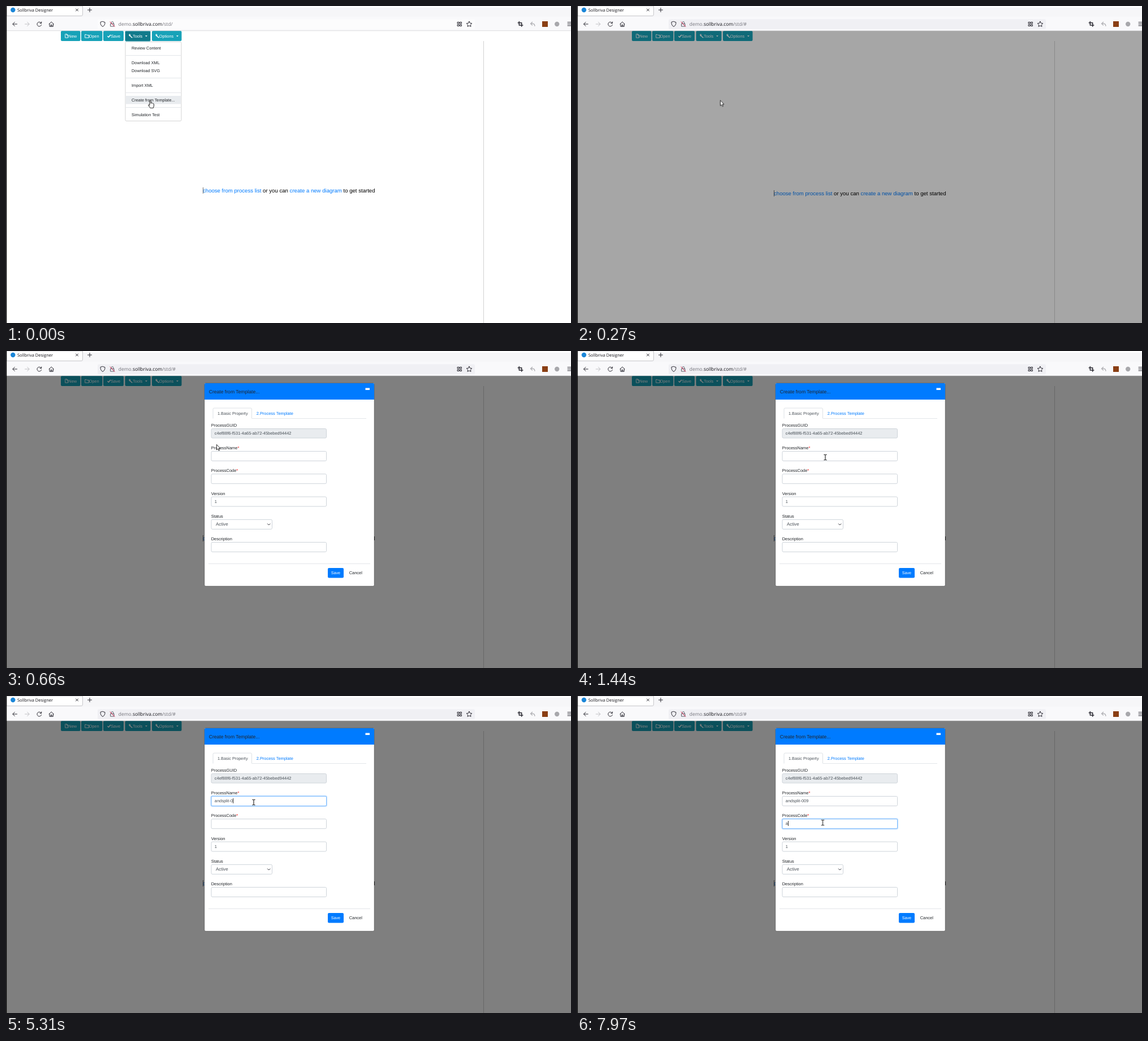
Recreate the animation shown at these times as an HTML page. Size 999x561 px, loop 8 s.

```html
<!DOCTYPE html>
<html lang="en">
<head>
<meta charset="utf-8">
<title>Process designer</title>
<style>
html, body { margin: 0; width: 100%; height: 100%; overflow: hidden; background: #fff; }
svg { display: block; width: 100%; height: 100%; }
text { font: 7.45px "Liberation Sans", Arial, sans-serif; text-rendering: geometricPrecision; white-space: pre; fill: #212529; }
.ui { font-family: "Open Sans", "Noto Sans", sans-serif; }
.line { fill: none; stroke: #2b2a33; stroke-width: 1; stroke-linecap: round; stroke-linejoin: round; }
.soft { fill: none; stroke: #e3e6e9; }
.btn rect { fill: #17a2b8; }
.btn text { fill: #fff; font-size: 7.4px; }
.btn path { fill: none; stroke: #fff; stroke-width: .9; stroke-linejoin: round; }
.btn .solid { fill: #fff; stroke: none; }
.menu text { font-size: 7.35px; }
.link { fill: #007bff; }
.field { fill: #fff; stroke: #ced4da; }
.val { fill: #495057; }
.must { fill: #f00; }

/* one 8 s cycle, every change is a hard cut */
.a { animation: 8s step-end infinite; }
.menu { animation-name: early; }
.hot { animation-name: early; }
.hash { animation-name: late; }
.intro { animation-name: settle; }
.urlbar { fill: #f0f0f4; animation-name: tint; }
.dim { animation-name: dim; }
.modal { animation-name: slide; }
.form { animation-name: load; }
.ring1 { animation-name: ring1; }
.ring2 { animation-name: ring2; }
.mouse { animation-name: path; }
.hand { animation-name: early; }
.arrow { animation-name: arrow; }
.beam { animation-name: beam; }

@keyframes early { 0% { visibility: visible } 1.875% { visibility: hidden } }
@keyframes late { 0% { visibility: hidden } 1.875% { visibility: visible } }
@keyframes settle { 0% { transform: none } 1.875% { transform: translateY(5px) } }
@keyframes tint { 0% { fill: #fcfcfd } 1.875% { fill: #f0f0f4 } }
@keyframes dim { 0% { opacity: 0 } 3.375% { opacity: .35 } 4.875% { opacity: .5 } }
@keyframes slide {
  0% { opacity: 0; transform: translateY(-30px) }
  4.875% { opacity: .45; transform: translateY(-20px) }
  6.75% { opacity: 1; transform: translateY(-3.5px) }
  8.25% { opacity: 1; transform: none }
}
@keyframes load { 0% { visibility: hidden } 6.75% { visibility: visible } }
@keyframes ring1 {
  0% { opacity: 0 } 19.875% { opacity: .35 } 21.375% { opacity: .85 }
  23.25% { opacity: 1 } 90.875% { opacity: 0 }
}
@keyframes ring2 { 0% { opacity: 0 } 90.875% { opacity: 1 } }
@keyframes path {
  0% { transform: translate(253px, 166.5px) }
  4.875% { transform: translate(257.5px, 166.5px) }
  6.75% { transform: translate(290px, 166px) }
  8.25% { transform: translate(372px, 165px) }
  9.75% { transform: translate(455px, 165px) }
  11.25% { transform: translate(492.5px, 166.5px) }
  13.125% { transform: translate(495px, 166.5px) }
  15% { transform: translate(482px, 171px) }
  16.5% { transform: translate(453px, 184px) }
  18% { transform: translate(439px, 188px) }
  19.875% { transform: translate(438px, 188px) }
  82.25% { transform: translate(438.5px, 203px) }
  84.125% { transform: translate(437px, 222px) }
  85.625% { transform: translate(434.5px, 224px) }
}
@keyframes arrow {
  0% { visibility: hidden } 1.875% { visibility: visible } 16.5% { visibility: hidden }
  82.25% { visibility: visible } 84.125% { visibility: hidden }
}
@keyframes beam {
  0% { visibility: hidden } 16.5% { visibility: visible }
  82.25% { visibility: hidden } 84.125% { visibility: visible }
}
</style>
</head>
<body>
<svg viewBox="0 0 999 561">
  <defs>
    <path id="wrench" d="M0-2.2 1.2-3.3 2.6-3.1 1.6-2 2.1-1.4 3.3-2.3 3.3-.8 2.2.2 3 .2 6.6 2.8 5.6 4 1.6.8.4.3Z"/>
    <path id="drop" d="M0 0h4l-2 2.2z"/>
  </defs>

  <!-- page -->
  <rect width="999" height="561" fill="#fff"/>
  <path d="M844.5 62V561" stroke="#d2d2d2"/>
  <g class="btn">
    <rect x="97" y="44" width="34.5" height="18" rx="2"/>
    <rect x="133" y="44" width="37.5" height="18" rx="2"/>
    <rect x="172" y="44" width="36" height="18" rx="2"/>
    <rect x="210.5" y="44" width="45" height="18" rx="2"/>
    <rect x="258" y="44" width="52.5" height="18" rx="2"/>
    <g class="a hot">
      <rect x="210.5" y="44" width="45" height="18.5" rx="2" style="fill:#117a8b;stroke:#8bd0db"/>
    </g>
    <path d="M104.7 49.8h3l1.8 1.8v4.6h-4.8zM107.5 49.8v2h2"/>
    <path d="M139.7 50.5h2.4l.8 1h3.6v4.7h-6.8z"/>
    <path d="M179.5 53.2l1.9 2 3.5-4.2" style="stroke-width:1.5"/>
    <use href="#wrench" class="solid" x="217.3" y="52.8" fill="#fff"/>
    <use href="#wrench" class="solid" x="264.5" y="52.8" fill="#fff"/>
    <use href="#drop" x="246" y="52.2" fill="#fff"/>
    <use href="#drop" x="301" y="52.2" fill="#fff"/>
    <text x="110.3" y="55.8">New</text>
    <text x="146.5" y="55.8">Open</text>
    <text x="185.2" y="55.8">Save</text>
    <text x="224" y="55.8">Tools</text>
    <text x="270.8" y="55.8">Options</text>
  </g>
  <g class="a intro">
    <text x="348" y="330" style="font-size:9.6px;fill:#000"><tspan class="link">choose from process list</tspan> or you can <tspan class="link">create a new diagram</tspan> to get started</text>
    <path d="M348.4 321v11" stroke="#333" stroke-width=".8"/>
  </g>
  <g class="a menu">
    <rect x="211" y="63.5" width="99" height="140" rx="2" fill="#fff" stroke="#d5d5d5"/>
    <rect x="211.5" y="159" width="98" height="14.5" fill="#e9ecef"/>
    <path class="soft" d="M211.5 87.5h98m-98 40h98m-98 26h98m-98 26h98"/>
    <text x="222" y="76.8">Review Content</text>
    <text x="222" y="102.8">Download XML</text>
    <text x="222" y="117.2">Download SVG</text>
    <text x="222" y="142.8">Import XML</text>
    <text x="222" y="168.8">Create from Template...</text>
    <text x="222" y="194.6">Simulation Test</text>
  </g>
  <rect class="a dim" y="44" width="999" height="517"/>

  <!-- dialog -->
  <g class="a modal">
    <rect x="351" y="57" width="300" height="43" rx="2" fill="#fff"/>
    <g class="a form">
      <rect x="351" y="57" width="300" height="359" rx="2" fill="#fff" stroke="#000" stroke-opacity=".25"/>
      <path class="soft" d="M435 119.5H637M358 376.5H644"/>
      <path d="M366 119.5V103q0-2 2-2h64.500q2 0 2 2v16.500" fill="none" stroke="#dee2e6"/>
      <text x="374" y="113" style="font-size:7.3px;fill:#495057">1.Basic Property</text>
      <text x="442.700" y="113" class="link">2.Process Template</text>

      <text x="362.700" y="134">ProcessGUID</text>
      <rect class="field" x="363" y="137.500" width="203.500" height="16.500" rx="2" style="fill:#e9ecef"/>
      <text x="368.800" y="148" class="val">c4ef88f6-f531-4a65-ab72-45bebed94442</text>

      <text x="362.700" y="174.200">ProcessName<tspan class="must">*</tspan></text>
      <rect class="field" x="363" y="177.500" width="203.500" height="17" rx="2"/>
      <g class="a ring1" fill="none">
        <rect x="362.300" y="176.800" width="205" height="18.400" rx="2.500" stroke="#bfdeff" stroke-width="1.500"/>
        <rect x="363" y="177.500" width="203.500" height="17" rx="2" stroke="#80bdff"/>
      </g>
      <text id="name" x="368.800" y="188.200" class="val"></text>
      <rect id="caret1" y="181" width=".8" height="9"/>

      <text x="362.700" y="214.400">ProcessCode<tspan class="must">*</tspan></text>
      <rect class="field" x="363" y="217.700" width="203.500" height="17" rx="2"/>
      <g class="a ring2" fill="none">
        <rect x="362.300" y="217" width="205" height="18.400" rx="2.500" stroke="#bfdeff" stroke-width="1.500"/>
        <rect x="363" y="217.700" width="203.500" height="17" rx="2" stroke="#80bdff"/>
      </g>
      <text id="code" x="368.800" y="228.400" class="val"></text>
      <rect id="caret2" y="221" width=".8" height="9"/>

      <text x="362.700" y="254.700">Version</text>
      <rect class="field" x="363" y="258" width="203.500" height="17" rx="2"/>
      <text x="368.800" y="268.800" class="val">1</text>

      <text x="362.700" y="295">Status</text>
      <rect class="field" x="363" y="298.300" width="107.500" height="17" rx="2"/>
      <text x="371" y="309.300" class="val" style="font-size:8px">Active</text>
      <path class="line" d="M462.500 305.800l2.200 2.200 2.200-2.200"/>

      <text x="362.700" y="335.300">Description</text>
      <rect class="field" x="363" y="338.500" width="203.500" height="17" rx="2"/>

      <rect x="569" y="384" width="28" height="17.500" rx="2" fill="#007bff"/>
      <text x="574.700" y="394.900" style="fill:#fff;font-size:7.2px">Save</text>
      <text x="606.700" y="394.900">Cancel</text>
    </g>
    <path d="M351 86V59q0-2 2-2h296q2 0 2 2v27z" fill="#007bff"/>
    <text x="358.700" y="75" style="font-size:8.600px">Create from Template...</text>
    <rect x="635.500" y="65.500" width="7.500" height="3.500" fill="#fff"/>
  </g>

  <!-- browser bars -->
  <rect width="999" height="44" fill="#f9f9fb"/>
  <rect y="3" width="999" height="16" fill="#f6f6f8"/>
  <rect width="999" height="3" fill="#fff"/>
  <path d="M1 0H135.500V15q0 2.500-2.500 2.500H1z" fill="#fff" stroke="#c8c8cc"/>
  <path d="M0 43.700H999" stroke="#d4d4d8" stroke-width=".8"/>
  <circle cx="12.300" cy="7" r="4.200" fill="#1b86d8"/>
  <text class="ui" x="20" y="9.800" style="font-size:7.500px;fill:#15141a">Sollbriva Designer</text>
  <path class="line" d="M123.500 5l4 4m0-4l-4 4M144.500 7h7m-3.500-3.500v7" stroke-width=".9"/>
  <path class="line" d="M19.500 32H12m3.300-3.500L11.800 32l3.500 3.500"/>
  <path class="line" d="M33.500 32H41m-3.300-3.500L41.200 32l-3.500 3.500" style="stroke:#c0c0c4"/>
  <path class="line" d="M62.300 30.300a3.900 3.900 0 1 0 .3 3M62.700 28v2.700H60"/>
  <path class="line" d="M76 32l4.200-3.900 4.200 3.900M77 31.500v4.700h6.400v-4.700M79.200 36v-2.500h2V36"/>

  <rect class="a urlbar" x="162" y="23.500" width="667" height="17.500" rx="2"/>
  <path class="line" d="M171 27.500l4 1.300q.2 5.600-4 7.700q-4.200-2.100-4-7.700z"/>
  <g class="line">
    <path d="M185 31.500h6v4.500h-6zM186 31.300v-1.500a2 2 0 0 1 4 0v1.500" style="stroke:#5b5b66"/>
    <path d="M184 28l8 8.500" style="stroke:#e22850"/>
  </g>
  <text class="ui" x="198.800" y="35" style="font-size:8.450px;fill:#73737b">demo.<tspan fill="#15141a">sollbriva.com</tspan>/std/<tspan class="a hash">#</tspan></text>
  <path class="line" d="M798.500 28.500h2.600v2.600h-2.600zm4.400 0h2.600v2.600h-2.600zm-4.400 4.400h2.600v2.600h-2.600zm4.400 0h2.600v2.600h-2.600z"/>
  <path class="line" d="M819 27.300l1.500 3 3.300.5-2.400 2.300.6 3.300-3-1.600-3 1.600.6-3.300-2.400-2.300 3.300-.5z"/>
  <path class="line" d="M907.300 27.500v6.500h6.500M905.300 29.700h6.400v6.600" style="stroke-width:1.500"/>
  <path class="line" d="M930.500 28.500l-3 2.700 3 2.700M928 31.200h3.500q3.200.3 3.400 4" style="stroke:#b4b4b8;stroke-width:1.400"/>
  <rect x="948" y="27" width="10" height="10" fill="#8a3f14"/>
  <circle cx="974.200" cy="32" r="4.200" fill="#a8a8ac"/>
  <path class="line" d="M993 28.800h6m-6 3h6m-6 3h6"/>
  <rect width="1.200" height="561"/>

  <!-- pointer -->
  <g class="a mouse">
    <path class="a hand" d="M1 1.200q1.300-1 2 .2l.3 4.500.4-1.200q1.400-.5 1.600.8q1.500-.4 1.700.7q1.300-.1 1.500 1.100v3.200l-1.200 3.500H2.200l-3.700-5q.2-1.700 2.500.2z" fill="#fff" stroke="#000" stroke-width=".9"/>
    <path class="a arrow" d="M.4.500v9.500l2.200-2 1.500 3.300 1.500-.7-1.500-3.200h2.800z" fill="#fff" stroke="#000" stroke-width=".8"/>
    <path class="a beam" d="M-2.500-4.500h1.700l.8.700.8-.7h1.700M-2.500 4.800h1.700l.8-.7.8.7h1.700M0-3.800v7.900" fill="none" stroke="#000"/>
  </g>
</svg>
<script>
const LOOP = 8000, LEFT = 368.8;
const $ = id => document.getElementById(id);

// each input: text, times of its keystrokes, and spans when its caret is lit
const inputs = [
  { text: $("name"), caret: $("caret1"), value: "andsplit-009",
    keys: [3010, 3010, 3180, 3440, 3690, 3810, 3940, 4210, 4910, 5310, 5430, 5690],
    lit: [[1590, 2140], [2700, 6000], [6430, 6970]] },
  { text: $("code"), caret: $("caret2"), value: "a",
    keys: [7970],
    lit: [[7120, 7700], [7970, LOOP]] }
];

function drawInput({ text, caret, value, keys, lit }, t) {
  const typed = value.slice(0, keys.filter(k => k <= t).length);
  if (text.textContent !== typed) text.textContent = typed;
  const width = typed ? text.getComputedTextLength() : 0;
  caret.setAttribute("x", LEFT + width + 0.3);
  caret.style.opacity = lit.some(([from, to]) => t >= from && t < to) ? 1 : 0;
}

let start;
function tick(now) {
  start ??= now;
  const t = (now - start) % LOOP;
  inputs.forEach(input => drawInput(input, t));
  requestAnimationFrame(tick);
}
requestAnimationFrame(tick);
</script>
</body>
</html>
```
